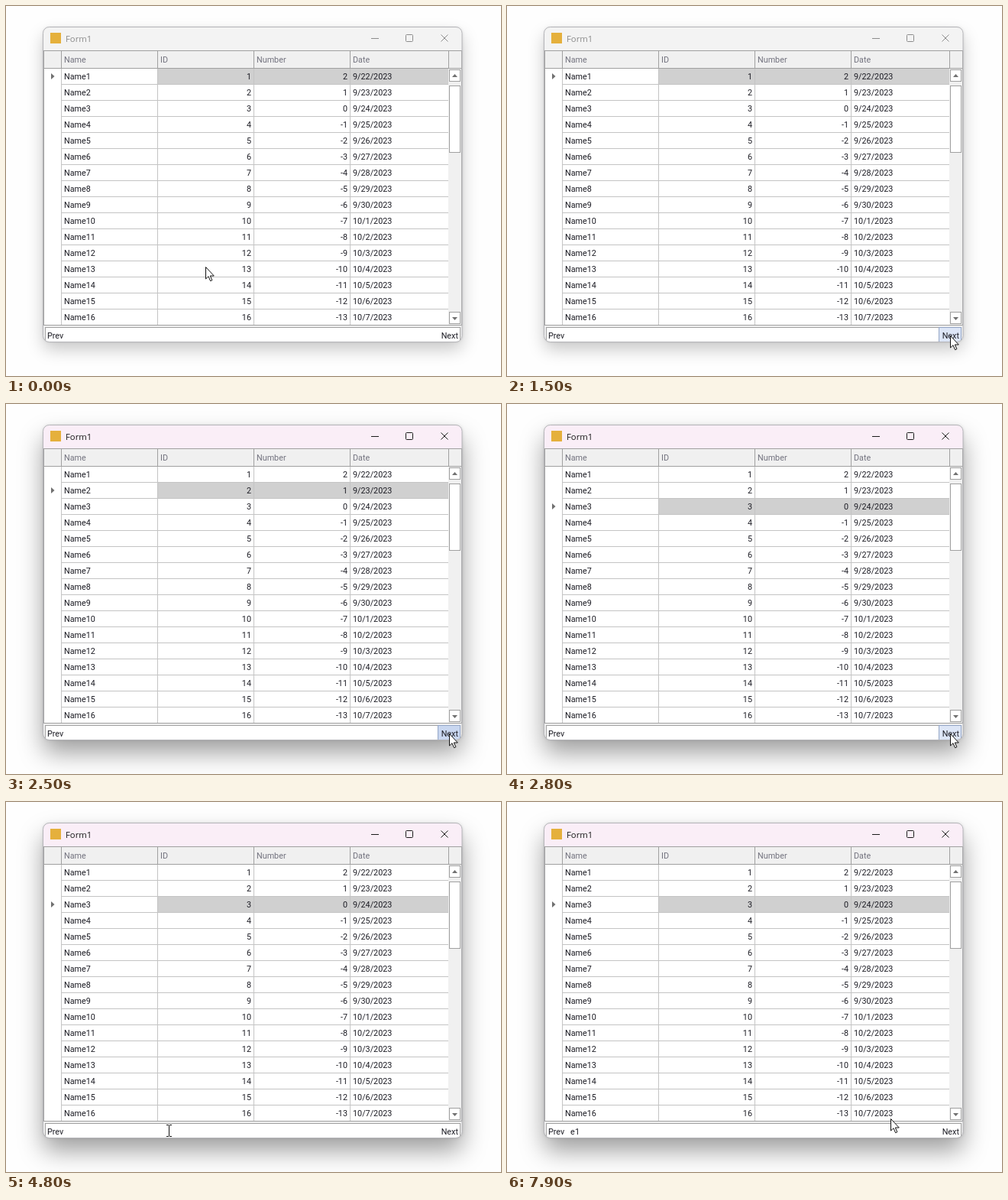
Recreate the animation shown at these times as an HTML page. Size 648 by 484 pixels, loop 8 s.

```html
<!DOCTYPE html>
<html lang="en">
<head>
<meta charset="utf-8">
<title>Grid navigation</title>
<style>
html, body { margin: 0; width: 100%; height: 100%; overflow: hidden; background: #fefefe; }
#stage { position: relative; width: 648px; height: 484px; overflow: hidden; }
#shadow { position: absolute; left: 49px; top: 28px; width: 548px; height: 411px; border-radius: 8px; }
svg { position: absolute; left: 0; top: 0; display: block; }
text { font: 10.8px Roboto, "Noto Sans", sans-serif; fill: #1c1c24; }
.head text { fill: #73737f; }
.end { text-anchor: end; }
.crisp { shape-rendering: crispEdges; }
.grid { stroke: #c4c4c4; fill: none; }
.frame { stroke: #a0a0a0; fill: none; }
.button { fill: #fff; stroke: #a0a0a0; }
#title { font: 11.3px "Open Sans", "Noto Sans", sans-serif; }

#shadow, #bar, #title, #tools, #focus, #hot, #caret, #typedE, #typed1, #pointer, #arrow, #beam {
  animation: 8s step-end infinite;
}
#shadow { animation-name: shadow; }
#bar { animation-name: bar; }
#title { animation-name: title; }
#tools { animation-name: tools; }
#focus { animation-name: focus; }
#hot { animation-name: hot; }
#caret { animation-name: caret; }
#typedE { animation-name: typedE; }
#typed1 { animation-name: typed1; }
#pointer { animation-name: pointer; }
#arrow { animation-name: arrow; }
#beam { animation-name: beam; }

/* Window activation */
@keyframes shadow {
  0% { box-shadow: 0 10px 22px rgba(0,0,0,.22), 0 0 4px rgba(0,0,0,.12); }
  25%, 100% { box-shadow: 0 17px 32px rgba(0,0,0,.38), 0 0 5px rgba(0,0,0,.14); }
}
@keyframes bar {
  0% { fill: #f3f3f3; }
  25% { fill: #f5f0f5; }
  26.25% { fill: #f8eff6; }
  27.5%, 100% { fill: #faeef7; }
}
@keyframes title { 0% { fill: #8c8c8c; } 25%, 100% { fill: #1a1a1a; } }
@keyframes tools { 0% { stroke: #8c8c8c; } 25%, 100% { stroke: #1a1a1a; } }

/* Selected row and Next button */
@keyframes focus {
  0% { transform: none; }
  27.5% { transform: translateY(21px); }
  35%, 100% { transform: translateY(42px); }
}
@keyframes hot {
  0% { opacity: 0; fill: #dde6f7; }
  11.25% { opacity: 1; fill: #dde6f7; }
  25% { opacity: 1; fill: #c9d7f0; }
  27.5% { opacity: 1; fill: #dde6f7; }
  30% { opacity: 1; fill: #c9d7f0; }
  35% { opacity: 1; fill: #dde6f7; }
  37.5%, 100% { opacity: 0; fill: #dde6f7; }
}

/* Text entry */
@keyframes caret {
  0% { opacity: 0; transform: none; }
  25% { opacity: 1; transform: none; }
  31.25% { opacity: 0; transform: none; }
  37.5% { opacity: 1; transform: none; }
  45% { opacity: 0; transform: none; }
  52.5% { opacity: 1; transform: none; }
  60% { opacity: 0; transform: none; }
  66.25% { opacity: 1; transform: none; }
  72.5% { opacity: 1; transform: translateX(6px); }
  76.25% { opacity: 1; transform: translateX(12px); }
  82.5% { opacity: 0; transform: translateX(12px); }
  88.75% { opacity: 1; transform: translateX(12px); }
  97.5%, 100% { opacity: 0; transform: translateX(12px); }
}
@keyframes typedE { 0% { opacity: 0; } 72.5%, 100% { opacity: 1; } }
@keyframes typed1 { 0% { opacity: 0; } 76.25%, 100% { opacity: 1; } }

/* Mouse */
@keyframes pointer {
  0% { transform: translate(261px, 341px); }
  2.5% { transform: translate(375px, 372px); }
  3.75% { transform: translate(520px, 420px); }
  5% { transform: translate(596px, 438px); }
  10% { transform: translate(597px, 446px); }
  11.25% { transform: translate(591px, 439px); }
  12.5% { transform: translate(586px, 436px); }
  16.25% { transform: translate(600px, 454px); }
  17.5% { transform: translate(609px, 464px); }
  18.75% { transform: translate(580px, 431px); }
  37.5% { transform: translate(545px, 418px); }
  38.75% { transform: translate(440px, 402px); }
  40% { transform: translate(350px, 398px); }
  41.25% { transform: translate(298px, 401px); }
  42.5% { transform: translate(269px, 406px); }
  43.75% { transform: translate(246px, 411px); }
  45% { transform: translate(230px, 416px); }
  46.25% { transform: translate(221px, 428px); }
  47.5% { transform: translate(215px, 430px); }
  48.75% { transform: translate(214px, 430px); }
  50% { transform: translate(213px, 430px); }
  88.75% { transform: translate(222px, 427px); }
  90% { transform: translate(262px, 405px); }
  91.25% { transform: translate(330px, 402px); }
  92.5% { transform: translate(400px, 405px); }
  93.75% { transform: translate(441px, 409px); }
  97.5% { transform: translate(478px, 412px); }
  98.75%, 100% { transform: translate(502px, 414px); }
}
@keyframes arrow { 0% { opacity: 1; } 46.25% { opacity: 0; } 90%, 100% { opacity: 1; } }
@keyframes beam { 0% { opacity: 0; } 46.25% { opacity: 1; } 90%, 100% { opacity: 0; } }
</style>
</head>
<body>
<div id="stage">
  <div id="shadow"></div>
  <svg width="648" height="484" viewBox="0 0 648 484">
    <clipPath id="shape"><rect x="49" y="28" width="548" height="411" rx="8"/></clipPath>
    <g clip-path="url(#shape)">
      <rect x="49" y="28" width="548" height="411" fill="#f0f0f0"/>
      <rect id="bar" x="49" y="28" width="548" height="30"/>
      <rect x="58" y="35" width="14" height="14" fill="#e5b03c"/>
      <text id="title" x="78" y="47">Form1</text>
      <g id="tools" fill="none">
        <path d="M478 42.5h10M569.5 37.5l9 9m0-9l-9 9"/>
        <rect x="523.5" y="37.5" width="9" height="9" rx="1"/>
      </g>

      <rect x="50" y="82" width="529" height="335" fill="#fff"/>
      <g id="focus">
        <rect class="crisp" x="199" y="82" width="380" height="20" fill="#d0d0d0"/>
        <path d="M59 88l4.500 4-4.500 4z" fill="#707070"/>
      </g>
      <g class="crisp">
        <path id="lines" class="grid"/>
        <path class="frame" d="M49 58.500H597M49 81.500H597M49 417.500H597M49.500 58V418M596.500 58V418M72.500 58V82M198.500 58V82M324.500 58V82M450.500 58V82M579.500 58V82"/>
        <rect class="button" x="580.5" y="83.500" width="14" height="15"/>
        <rect class="button" x="580.5" y="104.500" width="14" height="87"/>
        <rect class="button" x="580.5" y="400.500" width="14" height="15"/>
      </g>
      <path d="M584 93l3.500-4 3.500 4zM584 407h7l-3.500 4z" fill="#707070"/>
      <g class="head">
        <text x="76" y="74">Name</text>
        <text x="202" y="74">ID</text>
        <text x="328" y="74">Number</text>
        <text x="454" y="74">Date</text>
      </g>
      <g id="rows"></g>

      <rect class="crisp" x="51.500" y="420.500" width="543" height="22" fill="#fff" stroke="#a0a0a0"/>
      <rect id="hot" class="crisp" x="565.500" y="420.500" width="29" height="22" stroke="#93a5c6"/>
      <text x="54" y="435">Prev</text>
      <text id="typedE" x="83" y="435">e</text>
      <text id="typed1" x="89" y="435">1</text>
      <text x="592" y="435" class="end">Next</text>
      <rect id="caret" class="crisp" x="83" y="424" width="1" height="13"/>
    </g>
    <rect x="48.500" y="27.500" width="548.500" height="412" rx="8" fill="none" stroke="#b4b4b8"/>

    <g id="pointer">
      <path id="arrow" d="M.5.5v15.500l3.500-3.300 2.600 6 2.300-1-2.600-5.700h5z" fill="#fff" stroke="#111"/>
      <path id="beam" class="crisp" d="M-3 -7.500h3m1 0h3M.5 -7V7M-3 7.500h3m1 0h3" fill="none" stroke="#111"/>
    </g>
  </svg>
</div>
<script>
const rows = document.getElementById('rows');

function addText(x, y, value, end) {
  const el = document.createElementNS('http://www.w3.org/2000/svg', 'text');
  el.setAttribute('x', x);
  el.setAttribute('y', y);
  if (end) el.setAttribute('class', 'end');
  el.textContent = value;
  rows.append(el);
}

let lines = [72.5, 198.5, 324.5, 450.5].map(x => `M${x} 82V417`).join('');
for (let i = 0; i < 16; i++) {
  const y = 96 + 21 * i;
  const day = new Date(2023, 8, 22 + i);
  addText(76, y, `Name${i + 1}`);
  addText(321, y, i + 1, true);
  addText(447, y, 2 - i, true);
  addText(454, y, `${day.getMonth() + 1}/${day.getDate()}/${day.getFullYear()}`);
  if (i < 15) lines += `M72 ${102.5 + 21 * i}H579`;
}
document.getElementById('lines').setAttribute('d', lines);
</script>
</body>
</html>
```
